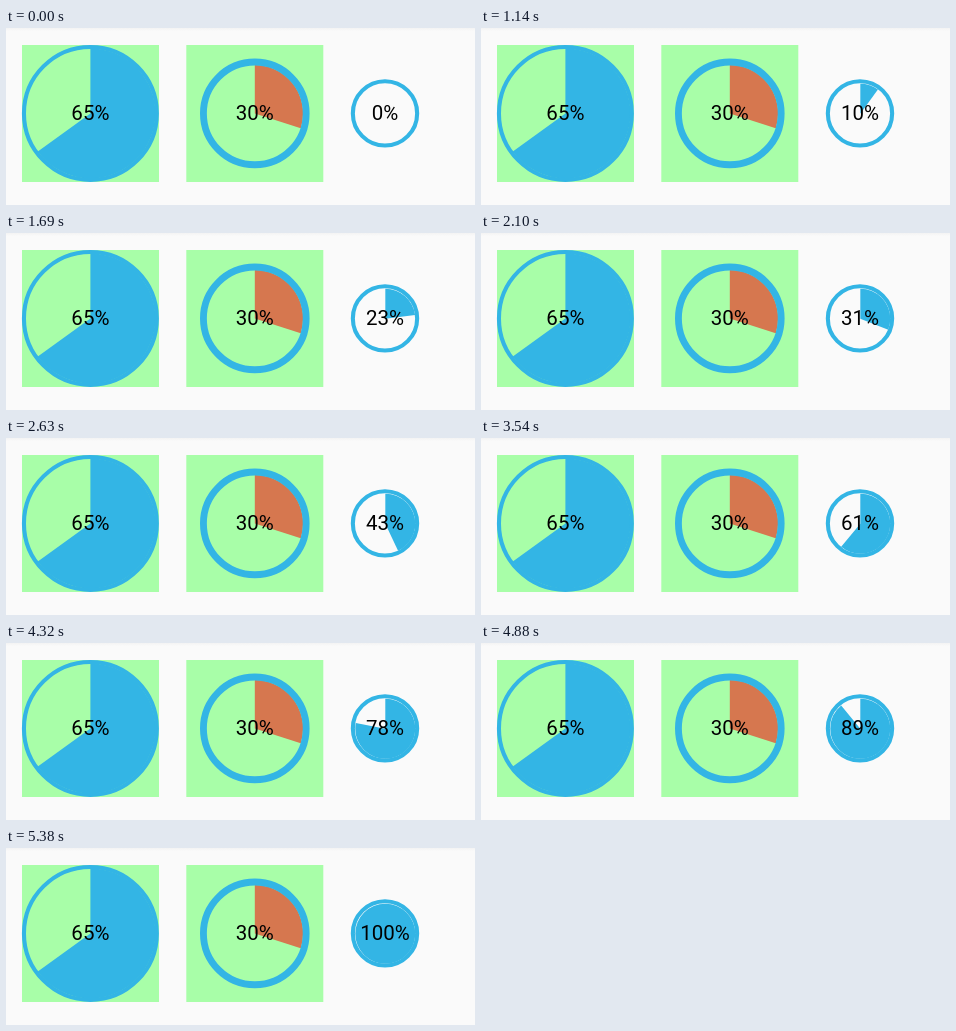
Recreate the animation shown at these times as an HTML page with a canvas. Size 469 by 177 pixels, loop 6.84 s.

```html
<!DOCTYPE html>
<html lang="en">
<head>
<meta charset="utf-8">
<title>Pie progress</title>
<style>
  html, body { margin: 0; width: 100%; height: 100%; overflow: hidden; background: #fafafa; }
  canvas { display: block; }
</style>
</head>
<body>
<canvas id="stage" width="469" height="177"></canvas>
<script>
const ctx = document.getElementById('stage').getContext('2d');
const LOOP = 6840;
const BLUE = '#33b5e5', ORANGE = '#d6774f', GREEN = '#a8fea8';
const CY = 85.4;

// time in ms, percent
const KEYS = [[750, 1], [1140, 10], [1690, 23], [2630, 43], [3540, 61], [4320, 78], [5380, 100]];

function percentAt(t) {
  if (t < KEYS[0][0]) return 0;
  for (let i = 1; i < KEYS.length; i++) {
    const [t0, p0] = KEYS[i - 1], [t1, p1] = KEYS[i];
    if (t < t1) return Math.floor(p0 + (p1 - p0) * (t - t0) / (t1 - t0) + 1e-6);
  }
  return 100;
}

function ring(x, y, outer, width) {
  ctx.beginPath();
  ctx.arc(x, y, outer - width / 2, 0, Math.PI * 2);
  ctx.lineWidth = width;
  ctx.strokeStyle = BLUE;
  ctx.stroke();
}

function pie(x, y, r, percent, color) {
  if (percent <= 0) return;
  const start = -Math.PI / 2;
  ctx.beginPath();
  if (percent < 100) ctx.moveTo(x, y);
  ctx.arc(x, y, r, start, start + Math.PI * 2 * percent / 100);
  ctx.closePath();
  ctx.fillStyle = color;
  ctx.fill();
}

function label(x, percent) {
  ctx.fillStyle = '#000';
  ctx.font = '20.5px Roboto, sans-serif';
  ctx.textAlign = 'center';
  ctx.textBaseline = 'alphabetic';
  ctx.fillText(percent + '%', x, CY + 7);
}

function background() {
  ctx.fillStyle = '#fafafa';
  ctx.fillRect(0, 0, 469, 177);
  const shade = ctx.createLinearGradient(0, 0, 0, 3);
  shade.addColorStop(0, '#f3f3f3');
  shade.addColorStop(1, '#fafafa');
  ctx.fillStyle = shade;
  ctx.fillRect(0, 0, 469, 3);
  ctx.fillStyle = GREEN;
  ctx.fillRect(16, 17, 137, 137);
  ctx.fillRect(180.3, 17, 137, 137);
}

function draw(t) {
  const percent = percentAt(t);
  background();

  pie(84.4, CY, 65, 65, BLUE);
  ring(84.4, CY, 68.5, 4.1);
  label(84.4, 65);

  pie(248.8, CY, 48.3, 30, ORANGE);
  ring(248.8, CY, 54.8, 6.85);
  label(248.8, 30);

  // The small offset leaves a faint seam at the upper left.
  ring(379, CY, 34.2, 4.1);
  pie(379.3, CY + 0.3, 30, percent, BLUE);
  label(379, percent);
}

const begin = performance.now();
function tick() {
  draw((performance.now() - begin) % LOOP);
  requestAnimationFrame(tick);
}
tick();
</script>
</body>
</html>
```
